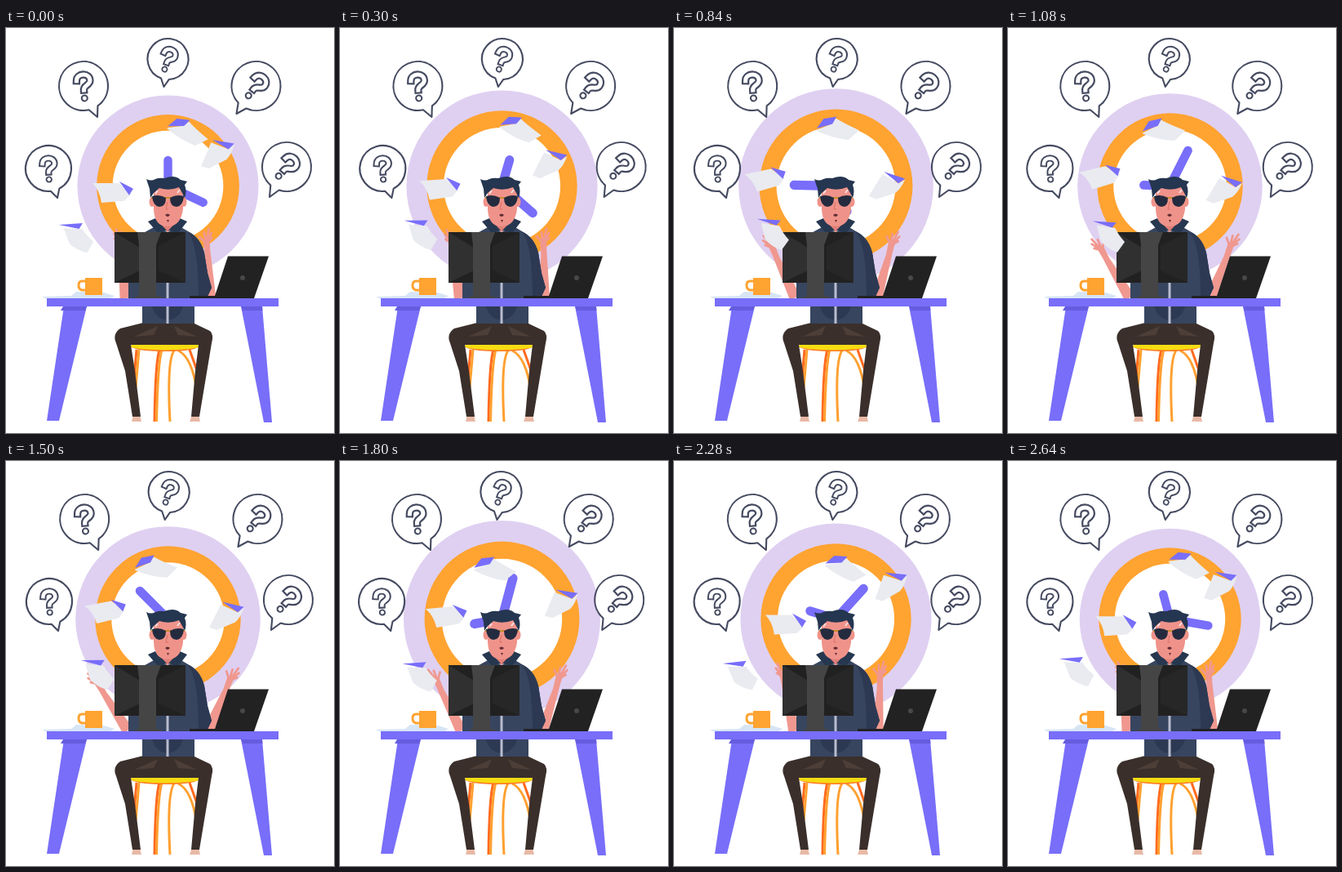
An HTML page for the animation above (2.7 s loop, 402 by 496 pixels).

```html
<!DOCTYPE html>
<html lang="en">
<head>
<meta charset="utf-8">
<title>Busy at the desk</title>
<style>
html, body { margin: 0; width: 100%; height: 100%; overflow: hidden; background: #fff; }
svg { display: block; width: 402px; height: 496px; }
</style>
</head>
<body>
<svg viewBox="0 0 402 496">
  <defs>
    <g id="arm" stroke="#f0988f" fill="none" stroke-linecap="round" stroke-linejoin="round">
      <path fill="#f0988f" stroke="none" d="M-7 6L-3-48-4-64 4-67 4-52 7 6Z"/>
      <path stroke-width="2.800" d="M-2-63L-8-70M-1-65L-2-75M1-66L4-79M2-65L7-74M2-63L7-68"/>
    </g>
    <path id="hook" fill="none" stroke-linecap="square" d="M-8-7C-7-17 9-16 8.500-6C8 0 0-1 0 5"/>
  </defs>

  <g id="clock">
    <circle r="116.500" fill="#dfd0f1"/>
    <circle r="91.700" fill="#ffa331"/>
    <circle r="71.200" fill="#fff"/>
    <g id="hands" stroke="#786ef9" stroke-width="11" stroke-linecap="round">
      <path d="M0 0V-33"/><path d="M0 0V-50" transform="rotate(115)"/>
    </g>
  </g>
  <g id="bubbles" fill="#fff" stroke="#454a60" stroke-width="2.100" stroke-linejoin="round"></g>

  <g id="right"><use href="#arm"/></g>
  <g id="left"><use href="#arm"/></g>

  <!-- stool and legs -->
  <g fill="none" stroke-width="3">
    <path stroke="#ff6a1f" d="M160 394L156 440M188 394Q183 410 182 482M225 394L236 425"/>
    <path stroke="#ffa02f" d="M163 394L159 440M191 394Q186 410 184.500 482M206 395Q197 408 201 482M211 395Q228 403 234 445"/>
  </g>
  <path fill="#ff7a22" d="M152 389H237Q234 396 195 396T152 389Z"/>
  <ellipse cx="195" cy="389.500" rx="42.500" ry="5" fill="#f6dc12"/>
  <path fill="#e8b9a6" d="M156 474H164L166 482H154ZM228 474H236L238 482H225Z"/>
  <path fill="#3a2f2b" d="M168 361H229L250 371Q255 375 252 386L237 476H227L232 420 236 388H153L158 420 165 476H155L146 420 135 386Q130 375 140 368Z"/>
  <path fill="#4d3f38" d="M157 378L186 365 181 376ZM234 378L206 365 211 376Z"/>

  <!-- jacket and head -->
  <path fill="#37455f" d="M183 243L198 250 213 243 223 249Q238 256 243 275L247 300 252 318 246 331H231V362H167V331H150V278Q156 256 172 249Z"/>
  <path fill="#2d3953" d="M222 249Q236 262 236 331H246L252 318 247 300 243 275Q238 256 222 249ZM179 341H217Q213 356 198 358 183 356 179 341Z"/>
  <path stroke="#b9bdcf" stroke-width="3" d="M198 250V362"/>
  <path fill="#e07f78" d="M190 232H207V243L198 250 190 243Z"/>
  <path fill="#263750" d="M174 237L183 233 197 248 186 251ZM222 237L213 233 199 248 211 251Z"/>
  <g fill="#ef938a">
    <ellipse cx="179" cy="213" rx="3.500" ry="6"/><ellipse cx="218" cy="213" rx="3.500" ry="6"/>
    <path d="M181 195H217V222Q214 243 198 243T181 222Z"/>
  </g>
  <path fill="#253650" d="M177 208L176 197 172 185Q178 188 183 185 188 183 194 184 207 179 214 186L222 188 219 192Q222 200 219 208L216 202 212 195Q200 200 188 196L181 202Z"/>
  <path stroke="#f5dfdd" stroke-width="2" d="M183 203L186 199M210 202L213 198"/>
  <path stroke="#c78c2d" stroke-width="2" fill="none" d="M178 208H219"/>
  <path fill="#242b3f" d="M179 206Q188 203 196 208 196 219 188 219 180 218 179 206ZM218 206Q209 203 201 208 201 219 209 219 217 218 218 206Z"/>
  <path stroke="#d87065" fill="none" d="M198 213L196 222H199"/>
  <path fill="#642d35" d="M195 229Q198 226 201 229 198 233 195 229ZM197 235H200L198.500 238Z"/>

  <!-- desk and what stands on it -->
  <path fill="#786ef9" d="M50 331H334V341H314L326 483H316L288 341H99L65 481H50L71 341H50Z"/>
  <path fill="#655cdf" d="M70 341H99L97 346H67ZM288 341H314L314.500 346H290Z"/>
  <path fill="#d7e5f5" d="M44 329L80 328 86 323 120 324 133 328 128 331H48Z"/>
  <path fill="none" stroke="#ffa331" stroke-width="3" d="M98 310H93Q89 310 89 315T93 321H98"/>
  <path fill="#ffa331" d="M97 306H118V327H97Z"/>
  <path fill="#212121" d="M133 250H220V312H133Z"/>
  <path fill="#303030" d="M133 250L164 269V297L133 312Z"/>
  <path fill="#272727" d="M220 250L187 267V297L220 312Z"/>
  <path fill="#454545" d="M161 250H190L184 266V327L193 331H157L163 327V266Z"/>
  <path fill="#222" d="M272 279.500H322L304 331H225V328H256Z"/>
  <circle cx="290" cy="306" r="3" fill="#484848"/>

  <g id="papers"></g>
</svg>
<script>
const LOOP = 2700, STEP = 60, TAU = 2 * Math.PI;
const $ = id => document.getElementById(id);

function add(parent, tag, attrs) {
  const node = document.createElementNS("http://www.w3.org/2000/svg", tag);
  for (const name in attrs) node.setAttribute(name, attrs[name]);
  return parent.appendChild(node);
}
const place = (node, x, y, rest = "") => node.setAttribute("transform", `translate(${x} ${y}) ${rest}`);

// One slow wave per loop around `mid`, highest at time `peak`.
const swing = (mid, size, peak) => t => mid + size * Math.cos(TAU * (t - peak) / LOOP);

function addBubble({ x, y, r, tail: [tx, ty], angle, scale, sway }) {
  const node = add($("bubbles"), "g");
  const mid = Math.atan2(ty, tx);
  const rim = a => `${r * Math.cos(a)} ${r * Math.sin(a)}`;
  add(node, "path", { d: `M${rim(mid + .2)}A${r} ${r} 0 1 1 ${rim(mid - .2)}L${tx} ${ty}Z` });
  const mark = add(node, "g", { transform: `rotate(${angle}) scale(${scale})` });
  add(mark, "use", { href: "#hook", stroke: "#454a60", "stroke-width": 9.4 });
  add(mark, "use", { href: "#hook", stroke: "#fff", "stroke-width": 5 });
  add(mark, "circle", { cy: 15, r: 3.5 });
  return t => place(node, x + sway * Math.sin(4 * TAU * t / LOOP), y);
}

function addPaper({ sheet, fold, x, y, turn }) {
  const node = add($("papers"), "g");
  add(node, "path", { d: sheet, fill: "#e9ebf0" });
  add(node, "path", { d: fold, fill: "#786ef9" });
  return t => place(node, x(t), y(t), `rotate(${turn(t)})`);
}

const movers = [
  ...[
    { x: 95, y: 71, r: 30, tail: [17, 38], angle: -5, scale: 1, sway: 1.2 },
    { x: 198.5, y: 38, r: 25, tail: [-5, 34], angle: 18, scale: .88, sway: 1.2 },
    { x: 306.5, y: 71, r: 30, tail: [-24, 34], angle: 38, scale: 1, sway: 2 },
    { x: 344, y: 170, r: 30, tail: [-21, 37], angle: 41, scale: 1, sway: 2 },
    { x: 52, y: 172, r: 28, tail: [11, 36], angle: -3, scale: .9, sway: 1 }
  ].map(addBubble),
  ...[
    {
      sheet: "M-25 3L-7-5-2-12Q10-5 27 2L14 14Q-5 13-25 4Z", fold: "M-25 1L-17-11-1-14-6-5Z",
      x: swing(203, 20, 100), y: swing(127, 5, 1980), turn: swing(7, 10, 2600)
    },
    {
      sheet: "M-22 13L-6-14 14-3 22-8Q17 4 10 9L-13 17Z", fold: "M-4-17L22-9 14-3Z",
      x: swing(264, 7, 1700), y: swing(174, 24, 1120), turn: swing(-5, 6, 900)
    },
    {
      sheet: "M-25-11L8-11 22 3 14 11-14 13Q-16-2-25-11Z", fold: "M8-13L25-4 20 4Z",
      x: swing(125, 12, 2250), y: swing(191.5, 10, 2550), turn: swing(-6, 7, 2450)
    },
    {
      sheet: "M-18-11L5-11Q9-4 19 4L12 18Q0 16-10 8Z", fold: "M-24-15L5-18 1-11Z",
      x: swing(104, 21, 1040), y: swing(258, 6.5, 1950), turn: swing(4.5, 5, 900)
    }
  ].map(addPaper)
];

// Two turns: speed up to `fast`, then slow down and pick up again.
function handAngle(t) {
  const fast = 1500, reached = 560;
  if (t < fast) return reached * (t / fast) ** 2.2;
  const v = 2 * (t - fast) / (LOOP - fast) - 1;
  return reached + (720 - reached) * (1 + v * Math.abs(v)) / 2;
}

const lift = swing(10, 14, LOOP / 2);

function draw(t) {
  const pulse = 1 - .049 * Math.cos(2 * TAU * (t + STEP) / LOOP);
  place($("clock"), 198.5, 193.5, `scale(${pulse})`);
  $("hands").setAttribute("transform", `rotate(${handAngle(t)})`);
  place($("right"), 250, 325, `rotate(${lift(t)})`);
  place($("left"), 146, 325, `scale(-1 1) rotate(${lift(t) + 9})`);
  for (const move of movers) move(t);
}

function tick() {
  draw(Math.floor(performance.now() % LOOP / STEP) * STEP);
  requestAnimationFrame(tick);
}
tick();
</script>
</body>
</html>
```
